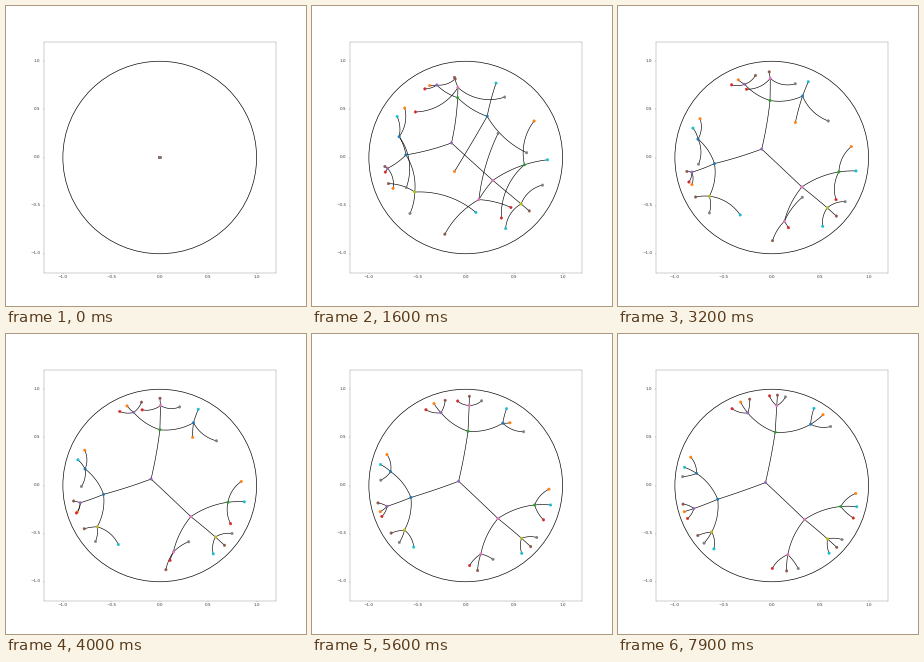
Animation, 300 px wide and 300 px high, one loop 8000 ms. Source, as a matplotlib script:

```python
from itertools import permutations

import numpy as np
import matplotlib.pyplot as plt
from matplotlib.animation import FuncAnimation
from matplotlib.collections import LineCollection

FRAMES, INTERVAL = 80, 100
BURST = 8                      # frames in which the nodes fly out of the centre
INNER, NODES = 13, 40          # ternary tree of depth three, breadth-first
ROOT = -0.0645 + 0.031j
DRIFT = -0.14 + 0.2j           # slow shift of the whole tree while it unfolds

# For each depth: directions of the three children and how far they reach.
FANS = [((201, 317, 77), (0.54, 0.54, 0.54)),
        ((79, 5.5, -86), (0.565, 0.512, 0.565)),
        ((56, 0, -58), (0.53, 0.5, 0.53))]
# Which permutation of its children each inner node spreads out.
ORDER = (0, 0, 3, 1, 5, 2, 0, 5, 2, 2, 2, 3, 0)
# Directions in which the leaves are first thrown.
THROW = (191, 230, 320, 208, 185, 184, 227, 141, 133,
         343, 238, 74, 6, 47, 270, 322, 353, 290,
         119, 122, 95, 336, 71, 223, 155, 103, 44)

depth = np.repeat([0, 1, 2, 3], [1, 3, 9, 27])
pace = np.array([25, 25, 8, 3.5])[depth]


def children(node):
    return slice(3 * node + 1, 3 * node + 4)


def shift(z, s):
    """Hyperbolic translation of the disc that takes the centre to s."""
    return (z + s) / (1 + np.conj(s) * z)


def ease(u, rate):
    return (1 - np.exp(-rate * u)) / (1 - np.exp(-rate))


def fan_layout():
    z = np.full(NODES, ROOT)
    heading = np.zeros(NODES)
    orders = list(permutations(range(3)))
    for node in range(INNER):
        for k, turn, reach in zip(orders[ORDER[node]], *FANS[depth[node]]):
            child = 3 * node + 1 + k
            step = reach * np.exp(1j * (heading[node] + np.radians(turn)))
            z[child] = shift(step, z[node])
            heading[child] = np.angle(-shift(z[node], -z[child]))
    return z


def thrown_layout():
    """Leaves on a ring, every inner node amid its children."""
    z = np.zeros(NODES, complex)
    z[INNER:] = 0.81 * np.exp(1j * np.radians(THROW))
    for node in reversed(range(INNER)):
        z[node] = z[children(node)].mean()
    return z


settled, thrown = fan_layout(), thrown_layout()
tangled = shift(thrown, -DRIFT)


def layout(frame):
    if frame <= BURST:
        return thrown * ease(frame / BURST, 2.5)
    u = (frame - BURST) / (FRAMES - 1 - BURST)
    z = tangled + (settled - tangled) * ease(u, pace)
    return shift(z, DRIFT * (1 - ease(u, 3.5)))


def geodesic(a, b, steps=np.linspace(0, 1, 40)):
    w = shift(b, -a)
    ray = np.tanh(steps * np.arctanh(abs(w))) * np.exp(1j * np.angle(w))
    return shift(ray, a)


def xy(z):
    return np.column_stack([z.real, z.imag])


plt.rcParams["text.hinting"] = "none"
fig, ax = plt.subplots(figsize=(10, 10), dpi=30)
ax.set(xlim=(-1.2, 1.2), ylim=(-1.2, 1.2))
ticks = np.arange(-1, 1.1, 0.5)
ax.set_xticks(ticks)
ax.set_yticks(ticks)
ax.tick_params(color="0.4", labelcolor="0.25")
ax.spines[:].set_color("0.45")
ax.add_patch(plt.Circle((0, 0), 1, fill=False, color="black", lw=1.6))

edges = ax.add_collection(LineCollection([], colors="black", lw=1.5))
# Colours cycle along the edge ends; an inner node keeps its last one.
colors = [f"C{(6 * n + 4 if n < INNER else 2 * n - 1) % 10}"
          for n in range(NODES)]
dots = ax.scatter(np.zeros(NODES), np.zeros(NODES), s=36, c=colors, lw=1,
                  zorder=3)


def draw(frame):
    z = layout(frame)
    edges.set_segments([xy(geodesic(z[(n - 1) // 3], z[n]))
                        for n in range(1, NODES)])
    dots.set_offsets(xy(z))
    return edges, dots


anim = FuncAnimation(fig, draw, frames=FRAMES, interval=INTERVAL,
                     repeat=True, repeat_delay=0)
plt.show()
```
